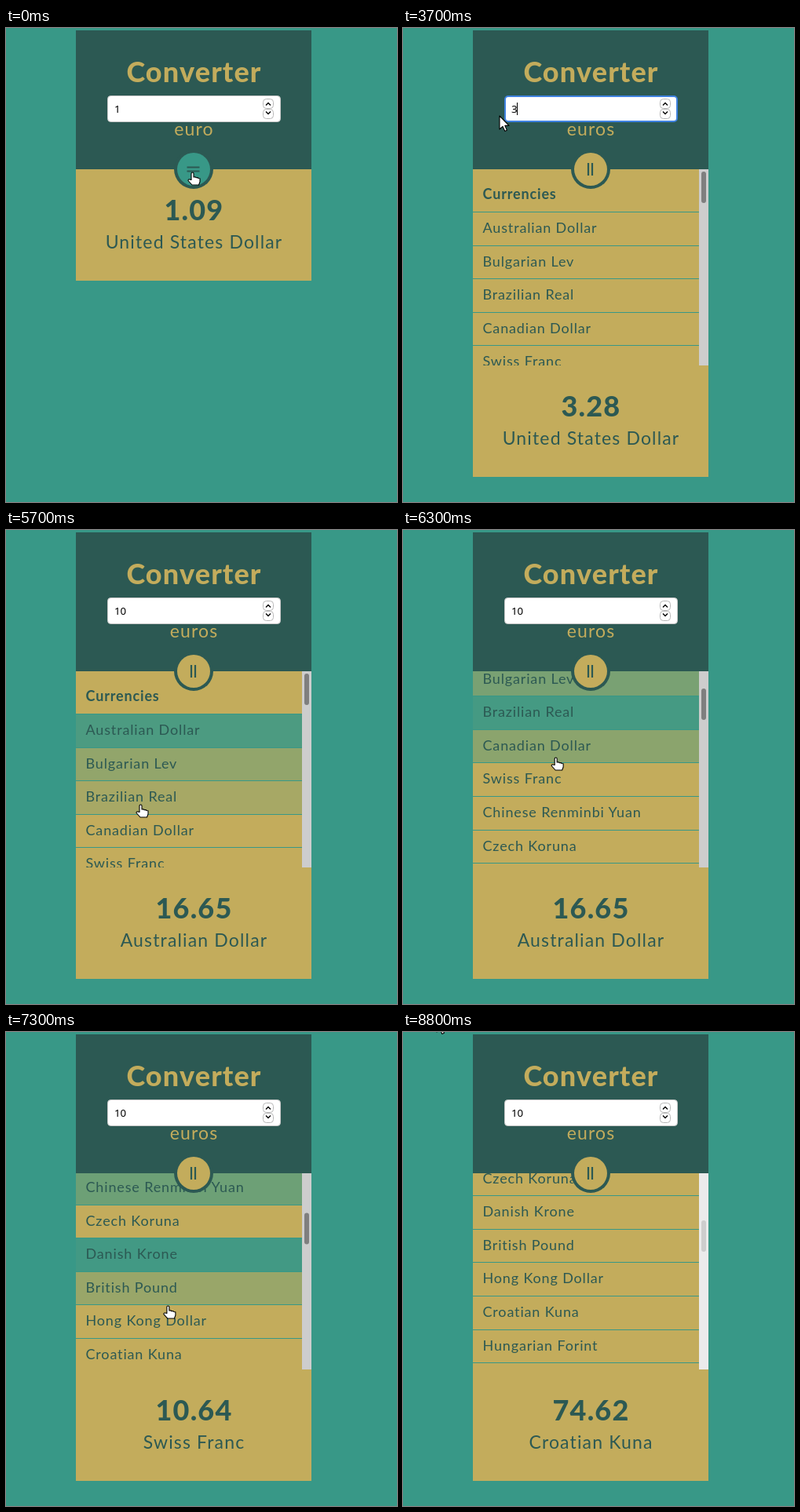
Animation, 498 px wide and 604 px high, one loop 8.9 s. Source, as an HTML page:

```html
<!DOCTYPE html>
<html lang="en">
<head>
<meta charset="utf-8">
<title>Converter</title>
<style>
  html, body { margin: 0; width: 100%; height: 100%; overflow: hidden; background: #389887; }
  svg { display: block; width: 498px; height: 604px; }
  text { font-family: Lato, sans-serif; fill: #2c5953; white-space: pre; }
  .mid { text-anchor: middle; letter-spacing: 1.15px; }
  .big { font-size: 36px; font-weight: 800; }
  .unit { font-size: 23px; }
  .gold { fill: #c3ac5c; }
  .item { font-size: 18px; letter-spacing: .85px; }
  .head { font-weight: 700; }
  #value { font: 500 13.33px "Noto Sans", sans-serif; fill: #000; }
  .spin rect { fill: #fff; stroke: #b8b8b8; }
  .spin path { fill: none; stroke: #000; stroke-width: 1.4; }
</style>
</head>
<body>
<svg viewBox="0 0 498 604">
  <defs><clipPath id="window"><rect id="opening" x="89" y="180" width="300" height="0"/></clipPath></defs>
  <rect width="498" height="604" fill="#389887"/>
  <rect x="89" y="3" width="300" height="177" fill="#2c5953"/>
  <rect id="panel" class="gold" x="89" y="180" width="300"/>

  <text class="mid big gold" x="239.5" y="69">Converter</text>
  <text class="mid unit gold" id="unit" x="239.5" y="137"></text>
  <rect id="field" fill="#fff" rx="4"/>
  <rect id="selection" x="138" y="95" width="8" height="17" fill="#3584e4"/>
  <text id="value" x="138" y="108"></text>
  <rect id="caret" y="95" width="1" height="16"/>
  <g class="spin">
    <rect x="327.5" y="90.5" width="13" height="12" rx="4"/>
    <rect x="327.5" y="103.5" width="13" height="12" rx="4"/>
    <path d="M331 98.5l3-3 3 3M331 106.5l3 3 3-3"/>
  </g>

  <g clip-path="url(#window)">
    <g id="rows"></g>
    <rect id="track" x="377" y="180" width="12" height="250"/>
    <rect id="thumb" x="380" width="6" height="40" rx="3"/>
  </g>

  <g id="result">
    <text class="mid big" id="amount" x="239.5" y="244.5"></text>
    <text class="mid unit" id="currency" x="239.5" y="280.5"></text>
  </g>

  <circle cx="239" cy="180" r="25" fill="#2c5953"/>
  <circle id="button" cx="239" cy="180" r="21"/>
  <path id="icon" d="M230.5 177.5h16M230.5 182.5h16" stroke="#2c5953" stroke-width="2.2"/>
  <path id="cursor" stroke="#000" stroke-width="1.1" stroke-linejoin="round"/>
</svg>
<script>
const LOOP = 8900, STEP = 100, SUBSTEP = 20;
const LIST_TOP = 234, ROW = 42.6, WHEEL = 108;
const GOLD = [195, 172, 92], TEAL = [56, 152, 135];
const $ = id => document.getElementById(id);

const currencies = ['Australian Dollar', 'Bulgarian Lev', 'Brazilian Real', 'Canadian Dollar',
  'Swiss Franc', 'Chinese Renminbi Yuan', 'Czech Koruna', 'Danish Krone', 'British Pound',
  'Hong Kong Dollar', 'Croatian Kuna', 'Hungarian Forint', 'Indonesian Rupiah'];

const events = [
  { at: 0, value: 1, currency: 'United States Dollar', rate: 1.093 },
  { at: 2400, focus: true },
  { at: 2600, selected: true },
  { at: 2800, value: 2, selected: false },
  { at: 3600, selected: true },
  { at: 3700, value: 3, selected: false },
  { at: 4600, selected: true },
  { at: 4700, value: 1, selected: false },
  { at: 4800, value: 10 },
  { at: 5500, focus: false, currency: 'Australian Dollar', rate: 1.665 },
  { at: 6700, currency: 'Swiss Franc', rate: 1.064 },
  { at: 7600, currency: 'Croatian Kuna', rate: 7.462 },
  { at: 8800, dim: true }
];
const wheelTurns = [6100, 6900, 7200];

// Pointer stops: time, x, y
const stops = [
  [400, 237, 184], [700, 238, 208], [1100, 237, 184], [1300, 237, 184], [1700, 191, 161],
  [2400, 148, 104], [2800, 52, 68], [3100, 150, 106], [3400, 150, 106], [3700, 123, 112],
  [4000, 100, 112], [4400, 145, 104], [4700, 97, 102], [5000, 100, 108], [5300, 148, 250],
  [5550, 152, 262], [5700, 171, 350], [6400, 198, 280], [6600, 204, 296], [6800, 208, 348],
  [7750, 204, 350], [7800, 202, 328], [8600, 43, -17]
];

const clamp = v => Math.min(1, Math.max(0, v));
const ease = v => { const p = clamp(v); return p * p * (3 - 2 * p); };
const mix = p => `rgb(${GOLD.map((c, i) => Math.round(c + (TEAL[i] - c) * p))})`;
const stateAt = t => Object.assign({}, ...events.filter(e => e.at <= t));
const openAt = t => ease((t - 1200) / 400);
const scrollAt = t => wheelTurns.reduce((sum, turn) => sum + WHEEL * ease((t - turn) / 200), 0);

function pointerAt(t) {
  const next = stops.findIndex(s => s[0] > t);
  if (next <= 0) return (next ? stops[stops.length - 1] : stops[0]).slice(1);
  const a = stops[next - 1], b = stops[next], p = (t - a[0]) / (b[0] - a[0]);
  return [a[1] + (b[1] - a[1]) * p, a[2] + (b[2] - a[2]) * p];
}

function hitTest(t) {
  const [x, y] = pointerAt(t);
  if (Math.hypot(x - 239, y - 180) < 25) return 'button';
  if (x > 129 && x < 350 && y > 86 && y < 120) return 'field';
  const row = Math.floor((y + scrollAt(t) - LIST_TOP) / ROW);
  const inList = openAt(t) > .5 && x > 89 && x < 377 && y > 180 && y < 430;
  return inList && row >= 0 ? row : 'page';
}

// Hover colours fade in quickly and out slowly
const fade = (tint, on, out) => clamp(tint + (on ? .5 : -out) * SUBSTEP / 100);

function simulateHover() {
  const frames = [];
  let button = 1, rows = currencies.map(() => 0);
  for (let t = 0; t < LOOP; t += SUBSTEP) {
    if (t % STEP === 0) frames.push({ button, rows });
    const hit = hitTest(t);
    button = fade(button, hit === 'button', .25);
    rows = rows.map((tint, i) => fade(tint, hit === i, .12));
  }
  return frames;
}
const hoverFrames = simulateHover();

function set(el, attrs) {
  for (const name in attrs) el.setAttribute(name, attrs[name]);
}

function add(tag, attrs, label = '') {
  const el = document.createElementNS('http://www.w3.org/2000/svg', tag);
  set(el, attrs);
  el.textContent = label;
  return $('rows').appendChild(el);
}

add('text', { class: 'item head', x: 101.5, y: 218 }, 'Currencies');
const rowBacks = currencies.map((name, i) => {
  const top = Math.round(LIST_TOP + i * ROW), bottom = Math.round(LIST_TOP + (i + 1) * ROW);
  add('rect', { x: 89, y: top, width: 288, height: 1, fill: '#389887' });
  const back = add('rect', { x: 89, y: top + 1, width: 288, height: bottom - top - 1 });
  add('text', { class: 'item', x: 101.5, y: top + 27 }, name);
  return back;
});

const arrow = { d: 'M0 0V17l4-3.6 2.8 6 2.6-1.2L6.8 12.4H12z', fill: '#fff' };
const beam = { d: 'M-3-8H3M0-8V8M-3 8H3', fill: 'none' };
const hand = {
  d: 'M-1 9.5V1.5a1.5 1.5 0 0 1 3 0V6l2-.3 1 1 2-.2 1 1 2 .3V12l-1.5 4H0L-5 10.5q0-2 2-1.5z',
  fill: '#fff'
};
const cursors = { page: arrow, field: beam };

function draw(t) {
  const open = openAt(t), scroll = scrollAt(t), [x, y] = pointerAt(t);
  const { value, currency, rate, focus, selected, dim } = stateAt(t);
  const hover = hoverFrames[t / STEP];

  set($('panel'), { height: 142 + 250 * open });
  set($('opening'), { height: 250 * open });
  set($('result'), { transform: `translate(0 ${250 * open})` });
  set($('rows'), { transform: `translate(0 ${-Math.round(scroll)})` });
  set($('track'), { fill: dim ? '#ebebeb' : '#cdcdcd' });
  set($('thumb'), { y: 183 + scroll * 19 / WHEEL, fill: dim ? '#cdcdcd' : '#7f7f7f' });
  rowBacks.forEach((back, i) => set(back, { fill: mix(hover.rows[i]) }));

  const inset = focus ? 1 : .5;
  set($('field'), {
    x: 129 + inset, y: 86 + inset, width: 221 - 2 * inset, height: 34 - 2 * inset,
    stroke: focus ? '#3f82e0' : '#c8c8c8', 'stroke-width': 2 * inset
  });
  set($('selection'), { opacity: selected ? 1 : 0 });
  set($('caret'), { x: 145 + 7.6 * (String(value).length - 1), opacity: focus && !selected ? 1 : 0 });
  $('value').style.fill = selected ? '#fff' : '#000';
  $('value').textContent = value;
  $('unit').textContent = value === 1 ? 'euro' : 'euros';
  $('amount').textContent = (value * rate).toFixed(2);
  $('currency').textContent = currency;

  set($('button'), { fill: mix(hover.button) });
  set($('icon'), { transform: `rotate(${90 * open} 238.5 180)` });
  set($('cursor'), { ...(cursors[hitTest(t)] || hand), transform: `translate(${x} ${y})` });
}

const start = performance.now();
function tick() {
  const t = (performance.now() - start) % LOOP;
  draw(Math.floor(t / STEP) * STEP);
  requestAnimationFrame(tick);
}
tick();
</script>
</body>
</html>
```
